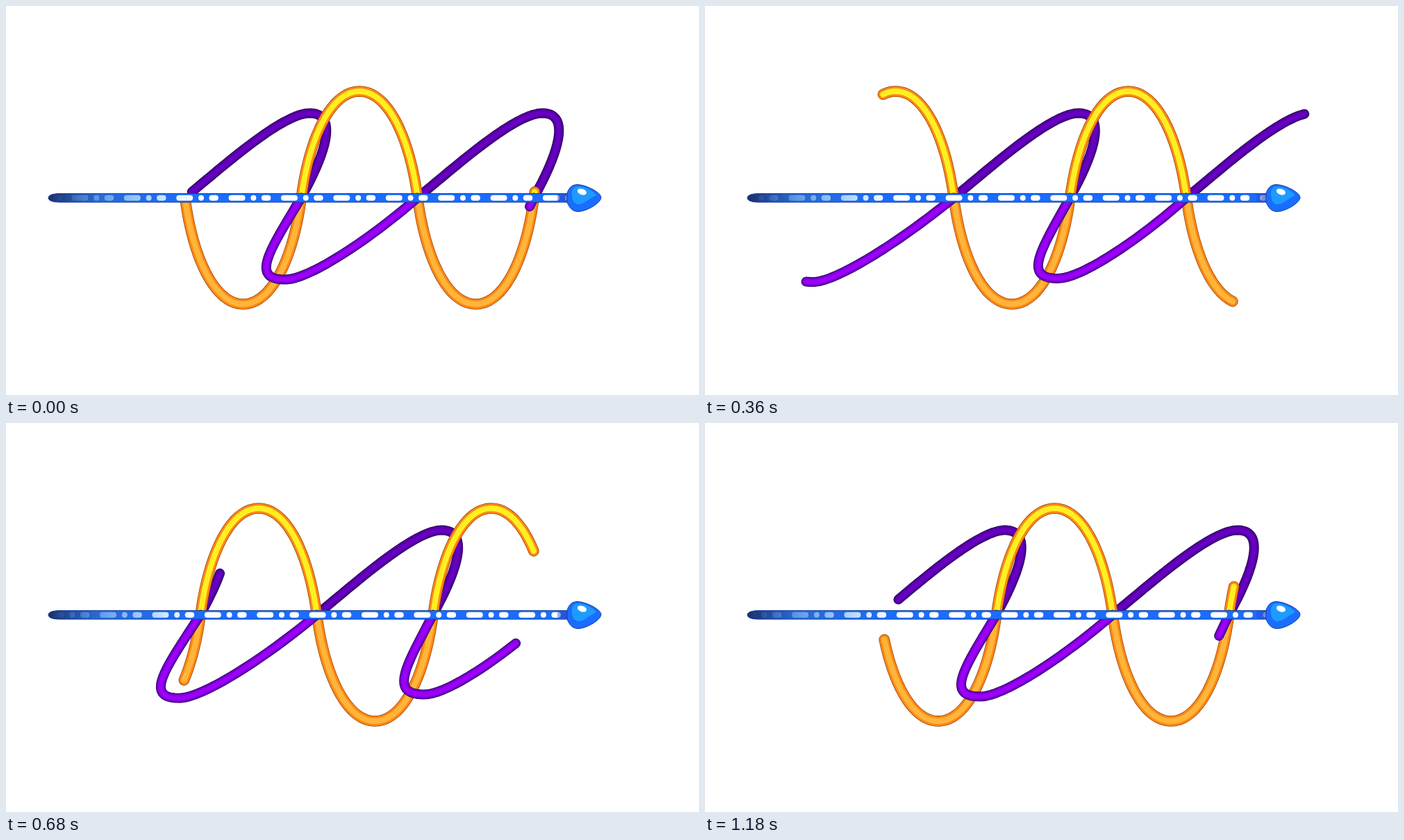
An HTML page for the animation above (1.2 s loop, 998 by 561 pixels).

```html
<!DOCTYPE html>
<html lang="en">
<head>
<meta charset="utf-8">
<title>Waves along an arrow</title>
<style>
  html, body { margin: 0; width: 100%; height: 100%; overflow: hidden; background: #fff; }
  svg { display: block; width: 100vw; height: 100vh; }
</style>
</head>
<body>
<svg viewBox="0 0 998 561" preserveAspectRatio="none">
  <defs>
    <linearGradient id="body" gradientUnits="userSpaceOnUse" x1="58" y1="0" x2="270" y2="0">
      <stop offset="0" stop-color="#1b2a63"/>
      <stop offset=".15" stop-color="#234a9c"/>
      <stop offset=".35" stop-color="#2a6ad2"/>
      <stop offset="1" stop-color="#1a6dff"/>
    </linearGradient>
    <linearGradient id="fade" gradientUnits="userSpaceOnUse" x1="65" y1="0" x2="275" y2="0">
      <stop offset="0" stop-color="#7ab8ff" stop-opacity="0"/>
      <stop offset=".5" stop-color="#a6d4ff" stop-opacity=".75"/>
      <stop offset=".85" stop-color="#e2f2ff"/>
      <stop offset="1" stop-color="#fff"/>
    </linearGradient>
    <linearGradient id="shade">
      <stop offset="0" stop-color="#2b49c4" stop-opacity=".4"/>
      <stop offset="1" stop-color="#2b49c4" stop-opacity=".75"/>
    </linearGradient>
    <clipPath id="shaft"><rect x="63" y="270" width="746" height="14"/></clipPath>
  </defs>
  <g id="waves" fill="none" stroke-linecap="round" stroke-linejoin="round"></g>
  <path d="M810 270.500H78C68 270.500 61 272.500 61 276.800C61 281 68 283 78 283H810Z" fill="url(#body)" stroke="#123f9e"/>
  <path id="dashes" fill="url(#fade)" clip-path="url(#shaft)"/>
  <rect x="794" y="271" width="16" height="12" fill="url(#shade)"/>
  <path d="M808 270C811 261 816 257.500 823 257.500C836 258 857 269 857 276C857 284 836 296.500 824 296.500C815 296.500 811 290 808 283Z" fill="#1a6dff" stroke="#123f9e"/>
  <path d="M815 274C814 264 818 260 825 260C836 261 847 268 850 273C842 276 834 285 825 286C818 286 816 280 815 274Z" fill="#1f9bff"/>
  <ellipse cx="829.500" cy="268" rx="6.800" ry="4.200" transform="rotate(20 829.500 268)" fill="#fff"/>
</svg>
<script>
const LOOP = 1200, STEP = 20, AXIS = 276.5, PERIOD = 335, HEIGHT = 153.5;
const SPEED = PERIOD / LOOP, DASH_SPEED = 0.2815, DASH_GAP = 75.4;
const $ = id => document.getElementById(id);

function bezier(p, t) {
  const s = 1 - t, w = [s * s * s, 3 * s * s * t, 3 * s * t * t, t * t * t];
  return [0, 1].map(k => w.reduce((sum, f, i) => sum + f * p[i][k], 0));
}

// One wave period spans u = 0..4: two quarters above the axis, then two below.
const crest = [[0, 1], [.5, 1], [.87, .55], [1, 0]];
const loops = [
  [[0, 0], [55, -45], [140, -122], [180, -122]],
  [[180, -122], [215, -122], [212, -80], [167.5, 0]],
  [[167.5, 0], [121.5, 76], [95.5, 118], [145.5, 118]],
  [[145.5, 118], [182.5, 118], [282.5, 44], [335, 0]]
];

function yellowAt(u, shift) {
  const n = Math.floor(u), t = u - n, rising = n % 2 === 0;
  const [d, h] = bezier(crest, rising ? 1 - t : t);
  const sign = Math.floor(u / 2) % 2 ? 1 : -1;
  return [425.25 + shift + PERIOD / 4 * (rising ? n + 1 - d : n + d), AXIS + sign * h * HEIGHT];
}

// The lower half is nearer to the viewer, so it spreads from x = 400.
function purpleAt(u, shift) {
  const lobe = Math.floor(u / 4), v = u - lobe * 4, n = Math.floor(v);
  let [x, y] = bezier(loops[n], v - n);
  x += 257.5 + shift + PERIOD * lobe;
  const near = Math.max(0, y) / 118 * (x - 400);
  return [x + .054 * near, AXIS + y - .0155 * near];
}

// Position on the yellow wave where it reaches x.
function findU(x, shift) {
  let lo = -12, hi = 12;
  for (let i = 0; i < 30; i++) {
    const mid = (lo + hi) / 2;
    if (yellowAt(mid, shift)[0] < x) lo = mid; else hi = mid;
  }
  return lo;
}

// Path data for the parts above and below the axis.
function halves(pointAt, from, to, shift) {
  const d = ['', ''];
  for (let k = Math.floor(from / 2); k * 2 < to; k++) {
    const lo = Math.max(from, k * 2), hi = Math.min(to, k * 2 + 2) - 1e-6;
    if (hi <= lo) continue;
    const count = Math.ceil((hi - lo) * 20);
    for (let i = 0; i <= count; i++) {
      const p = pointAt(lo + (hi - lo) * i / count, shift);
      d[k & 1] += (i ? 'L' : 'M') + p.map(c => c.toFixed(2)).join(' ');
    }
  }
  return d;
}

function tube(layers) {
  const paths = layers.map(([color, width]) => {
    const path = document.createElementNS('http://www.w3.org/2000/svg', 'path');
    path.setAttribute('stroke', color);
    path.setAttribute('stroke-width', width);
    $('waves').appendChild(path);
    return path;
  });
  return d => paths.forEach(path => path.setAttribute('d', d));
}

const purpleTop = tube([['#24004f', 14], ['#4a0092', 12.4], ['#5b00ae', 9], ['#6700c2', 5]]);
const yellowLow = tube([['#94400a', 15.6], ['#ff8814', 14], ['#ffb53a', 8]]);
const yellowTop = tube([['#94400a', 15.6], ['#ff8814', 14], ['#ffef22', 8]]);
const purpleLow = tube([['#2b0060', 14], ['#6500b8', 12.4], ['#8200dc', 9.4], ['#9d00fa', 6]]);

function pill(cx, w) {
  const run = w - 8;
  return `M${cx - run / 2} ${AXIS - 3.7}h${run}a4 4 0 0 1 0 8h${-run}a4 4 0 0 1 0 -8Z`;
}

function draw(time) {
  const shift = SPEED * time, turn = 4 * Math.PI * time / LOOP;

  // Both tubes show one and a half periods; their ends sway twice per loop.
  const tail = .06 - 4 * time / LOOP - .11 * Math.sin(turn);
  const [pTop, pLow] = halves(purpleAt, tail, tail + 6, shift);
  const left = 256.6 + 2 * Math.cos(turn + .84);
  const [yTop, yLow] = halves(yellowAt, findU(left, shift), findU(left + 503.5, shift), shift);
  purpleTop(pTop);
  yellowLow(yLow);
  yellowTop(yTop);
  purpleLow(pLow);

  let d = '';
  const first = (31 + DASH_SPEED * time) % DASH_GAP;
  for (let c = first - DASH_GAP; c < 830; c += DASH_GAP) {
    d += pill(c, 24) + pill(c + 23.8, 8) + pill(c + 42, 13.5);
  }
  $('dashes').setAttribute('d', d);
}

const start = performance.now();
function tick() {
  const time = (performance.now() - start) % LOOP;
  draw(Math.floor(time / STEP) * STEP);
  requestAnimationFrame(tick);
}
tick();
</script>
</body>
</html>
```
